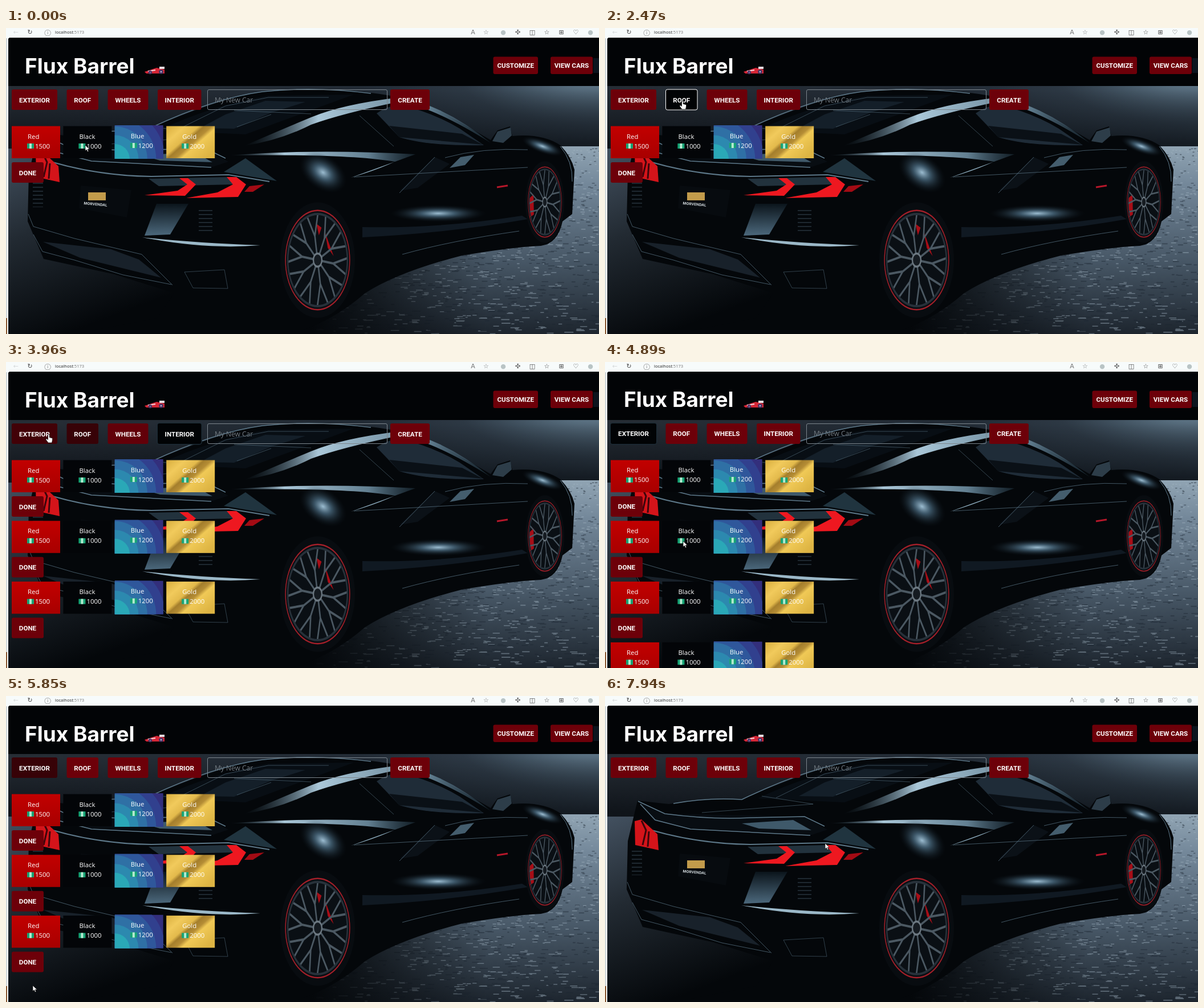
An HTML page that plays this animation: 1040 px wide and 538 px high, repeating every 8000 ms.

```html
<!DOCTYPE html>
<html lang="en">
<head>
<meta charset="utf-8">
<title>Car customizer</title>
<style>
html, body { margin: 0; width: 100%; height: 100%; overflow: hidden; background: #04070a; }
svg { display: block; width: 100%; height: 100%; }
text { dominant-baseline: central; }
.btn { font: 700 11.6px Roboto, sans-serif; fill: #fff; text-anchor: middle; }
.card { font: 11.4px "Open Sans", "Noto Sans", sans-serif; fill: #fff; }
.title { font: 700 37px Inter, sans-serif; fill: #fff; }
.hint { font: 12px "Open Sans", sans-serif; fill: #737b82; }
.url { font: 7.6px "Open Sans", sans-serif; fill: #222; }
.plate { font: 700 6.4px Inter, sans-serif; fill: #d5dce0; text-anchor: middle; }
.icons { font: 11px "DejaVu Sans", sans-serif; fill: #444; text-anchor: middle; }
.line { fill: none; stroke: #5d7889; }
.slats { stroke: #1e2830; stroke-dasharray: 2 5; }
</style>
</head>
<body>
<svg viewBox="0 0 1040 538" preserveAspectRatio="none">
  <defs>
    <linearGradient id="wall">
      <stop stop-color="#262d35"/><stop offset=".6" stop-color="#222b35"/><stop offset="1" stop-color="#3b4a58"/>
    </linearGradient>
    <linearGradient id="wallFade" x2="0" y2="1">
      <stop offset=".5" stop-color="#080c11" stop-opacity="0"/><stop offset=".95" stop-color="#080c11" stop-opacity=".75"/>
    </linearGradient>
    <radialGradient id="lamp">
      <stop stop-color="#7590a3"/><stop offset="1" stop-color="#4a6070" stop-opacity="0"/>
    </radialGradient>
    <linearGradient id="floor" x2="0" y2="1">
      <stop stop-color="#90a4b3"/><stop offset=".2" stop-color="#74889a"/><stop offset=".6" stop-color="#485867"/>
      <stop offset="1" stop-color="#1d252e"/>
    </linearGradient>
    <linearGradient id="floorShade">
      <stop offset=".1" stop-color="#04070a"/><stop offset=".65" stop-color="#04070a" stop-opacity="0"/>
    </linearGradient>
    <linearGradient id="leftFloor" x2=".35" y2="1">
      <stop stop-color="#435160"/><stop offset=".45" stop-color="#222a32"/><stop offset="1" stop-color="#04070a"/>
    </linearGradient>
    <radialGradient id="glow">
      <stop stop-color="#9cbdd1"/><stop offset=".35" stop-color="#466478" stop-opacity=".85"/>
      <stop offset="1" stop-color="#0c151c" stop-opacity="0"/>
    </radialGradient>
    <linearGradient id="shine">
      <stop stop-color="#2d4656" stop-opacity="0"/><stop offset=".3" stop-color="#aac7d8"/>
      <stop offset=".75" stop-color="#627f91"/><stop offset="1" stop-color="#2d4656" stop-opacity=".4"/>
    </linearGradient>
    <linearGradient id="panel" x2="0" y2="1">
      <stop stop-color="#0b141b"/><stop offset="1" stop-color="#4c687c"/>
    </linearGradient>
    <linearGradient id="redCard" x2="0" y2="1"><stop stop-color="#c20000"/><stop offset="1" stop-color="#a80000"/></linearGradient>
    <linearGradient id="goldCard" x2="1" y2=".75">
      <stop stop-color="#d8ae3e"/><stop offset=".25" stop-color="#f1ca5c"/><stop offset=".43" stop-color="#e3ba4c"/>
      <stop offset=".5" stop-color="#a47e2c"/><stop offset=".6" stop-color="#b58d35"/><stop offset=".68" stop-color="#f0c956"/>
      <stop offset="1" stop-color="#ddb443"/>
    </linearGradient>
    <clipPath id="pageClip"><path d="M4 538V21q0-4 4-4H1040V538z"/></clipPath>
    <clipPath id="blueClip"><path d="M0 0h85v59h-85z"/></clipPath>
  </defs>

  <rect width="1040" height="538" fill="#f7fbfb"/>
  <path d="M1 18V510" stroke="#d2dadc" stroke-width="2"/><path d="M1 510V538" stroke="#8a5a34" stroke-width="2"/>

  <g clip-path="url(#pageClip)">
    <!-- backdrop -->
    <rect width="1040" height="538" fill="#04070a"/>
    <rect width="1040" height="215" fill="url(#wall)"/>
    <ellipse cx="1030" cy="75" rx="240" ry="95" fill="url(#lamp)"/>
    <rect width="1040" height="215" fill="url(#wallFade)"/>
    <rect y="212" width="300" height="326" fill="url(#leftFloor)"/>
    <rect x="480" y="208" width="560" height="330" fill="url(#floor)"/>
    <g id="grain" stroke-width="1.6" opacity=".45"></g>
    <rect x="480" y="208" width="560" height="330" fill="url(#floorShade)"/>

    <!-- body -->
    <path fill="#04070a" d="M57 184L112 190Q175 178 240 182Q380 121 450 112Q540 101 640 114Q730 124 790 162L850 197L862 180L884 173L888 190Q940 185 972 206Q992 227 997 249L993 327L976 340Q968 379 938 383Q890 385 800 400Q690 428 630 466Q570 518 500 538H120L265 510L295 466L190 433L66 406L38 340L40 255z"/>
    <path d="M268 180Q360 136 460 119L610 117L520 150L420 187z" fill="#080e14"/>
    <path d="M385 152L455 128L525 130L465 149L400 177L340 176z" fill="#141f29"/>
    <g class="line">
      <path d="M120 189Q180 178 240 182Q360 124 450 112Q540 102 640 115" stroke-width="1.5"/>
      <path d="M300 179L385 137L460 122H566M400 145L535 151M405 174L465 152M275 176L365 190L170 205M620 154L680 208" opacity=".55"/>
    </g>
    <path d="M418 207Q480 180 535 157T690 122Q770 136 850 202Q755 142 692 129Q590 150 535 170Q480 198 418 207z" fill="url(#shine)"/>
    <path d="M650 150Q668 137 690 135Q748 148 796 177L838 206Q740 208 690 192z" fill="#1f2c38"/>
    <path d="M672 172L800 186L836 205L690 192z" fill="#0a1016"/>
    <path d="M862 182L885 175L887 189L872 202L853 199z" fill="#2d3d49"/>

    <path d="M390 224Q540 212 718 222L682 235Q600 221 390 224z" fill="url(#shine)"/>
    <path d="M718 222L605 263Q650 250 682 235z" fill="#8aa8b9"/>
    <ellipse cx="556" cy="254" rx="46" ry="30" fill="url(#glow)" transform="rotate(35 556 254)"/>
    <path d="M752 227L691 286L722 281L778 239z" fill="#0b1117"/>
    <path class="line" d="M752 227L690 290M610 262L915 245M770 228Q835 210 915 214M695 398Q780 374 900 357" opacity=".7"/>
    <path d="M778 246L797 227L821 223L805 241z" fill="#445d6d"/>
    <ellipse cx="758" cy="326" rx="84" ry="15" fill="url(#glow)"/>
    <path d="M625 350Q760 353 905 330L915 336Q780 360 625 368z" fill="#101922"/>
    <ellipse cx="941" cy="208" rx="38" ry="12" fill="url(#glow)" transform="rotate(20 941 208)"/>
    <path class="line" d="M972 208Q994 234 993 270"/>
    <path d="M861 280L880 277" stroke="#b5172a" stroke-width="3"/>

    <!-- tail -->
    <path d="M57 184L105 207L350 212L390 235L360 245L150 235L86 219z" fill="#080d12"/>
    <path class="line" d="M58 185L105 207Q190 218 255 214L350 212L385 229M62 190L88 218L150 234L360 245" stroke-width="1.5"/>
    <path d="M240 224L330 218L362 236L270 233z" fill="#3f596a"/>
    <path class="line" d="M82 236Q165 260 255 261L390 258L462 270" stroke-width="2.2"/>
    <path d="M382 253L420 229L475 269z" fill="#20343f"/>
    <path d="M250 265L392 262L400 275L268 278z" fill="#22323d"/>
    <path d="M52 220L64 217L92 243L94 271L53 262z" fill="#d4141a"/>
    <path d="M64 219L72 236L66 262M77 238L75 265" fill="none" stroke="#3c060b" stroke-width="3"/>
    <g fill="#ee1820">
      <path d="M243 294L301 286L318 275L304 264H319L333 275L314 295z"/>
      <path d="M316 299L371 289L398 275L387 262H404L421 275L407 297z"/>
      <path d="M418 288L427 278L453 275L433 288z" fill="#a30b14"/>
    </g>
    <path d="M131 277L220 285L212 333L128 317z" fill="#070b0f"/>
    <rect x="144" y="289" width="31" height="14" fill="#c29b4b"/>
    <text class="plate" x="157" y="310" transform="rotate(5 157 310)">MORVENDAL</text>
    <path d="M264 309L320 309L288 363L243 365z" fill="url(#panel)"/>
    <path d="M239 368Q330 378 446 382Q350 390 239 368z" fill="#9bb8c8"/>
    <path class="slats" d="M56 272V315" stroke-width="18"/><path class="slats" d="M350 320V358" stroke-width="24"/>
    <path class="line" d="M39 327L48 349L120 370L238 398L292 452M48 363L64 393L120 408L205 434L290 451" opacity=".7"/>
    <path d="M65 376L184 389L233 407L272 439L130 404z" fill="#18212a"/>
    <path class="line" d="M313 429L383 425L389 458L328 457z" opacity=".5"/>
    <g id="wheels"></g>

    <g id="page">
      <rect width="1040" height="102" fill="#020406"/>
      <path d="M1030 53h10v26h-10z" fill="#0c151e"/>
      <text class="title" x="33" y="66">Flux Barrel</text>
      <path d="M243 77L264 70L278 73V80H246z" fill="#d62636"/><path d="M269 68h9v4h-9z" fill="#eadfe4"/>
      <path d="M249 76l13-2" stroke="#f5d8dd" stroke-width="2"/>
      <g fill="#c9bfd5" stroke="#4b3568" stroke-width="2.5"><circle cx="253" cy="78" r="2"/><circle cx="272" cy="77" r="2.600"/></g>
      <rect x="353.500" y="108.500" width="315" height="35" rx="2.500" fill="none" stroke="#7d868d"/>
      <text class="hint" x="366" y="126">My New Car</text>
      <g id="controls"></g>
    </g>
  </g>

  <g class="icons" id="icons"></g>
  <text class="url" x="86" y="7">localhost<tspan fill="#777">:5173</tspan></text>
  <path id="arrow" d="M0 0V10L2.400 7.800L4 11.500L5.800 10.700L4.200 7.200H7.500z" fill="#fff" stroke="#111" stroke-width=".7"/>
  <path id="hand" d="M-1.500 1q1.500-2 2.700 0V5.500L6 6.700Q7 7 6.500 10L5.500 15H-1L-5 9.500q-.5-2 1.500-1.500L-1.500 9.500z" fill="#fff" stroke="#111" stroke-width=".8"/>
</svg>

<script>
const LOOP = 8000, STEP = 125, FADE = 250, PRESS = 300, ROW_GAP = 106.8, SCROLL = 67;
const $ = id => document.getElementById(id);
const clamp = v => Math.min(1, Math.max(0, v));
const ease = v => v * v * (3 - 2 * v);
const latest = (list, t) => list.findLast(entry => entry[0] <= t);

// Key points of the pointer's path: time, x, y
const path = [
  [0, 139, 206], [600, 337, 210], [750, 412, 180], [875, 53, 250], [1000, 46, 249], [1570, 46, 249],
  [1875, 133, 130], [2375, 136, 128], [2500, 205, 129], [2625, 210, 129], [2750, 295, 128], [3000, 308, 127],
  [3375, 307, 127], [3875, 75, 127], [4375, 71, 124], [4875, 137, 315], [5125, 137, 315],
  [5500, 47, 509], [5900, 47, 509], [6250, 38, 466], [6500, 38, 466], [7000, 38, 366], [7125, 38, 366],
  [7375, 38, 260], [7625, 38, 254], [7875, 386, 259]
];
const rowCounts = [[0, 1], [1570, 0], [2230, 1], [2600, 2], [3020, 3], [4080, 4], [5730, 3], [6480, 2], [7160, 1], [7700, 0]];
const focusChanges = [[0, ""], [2230, "ROOF"], [2520, "WHEELS"], [2830, "INTERIOR"], [4030, "EXTERIOR"], [5730, ""]];

const rowsAt = t => latest(rowCounts, t)[1];
const scrollAt = t => t < 5730 ? SCROLL * ease(clamp((t - 4890) / 240)) : 0;

function pointerAt(t) {
  const time = Math.floor(t / STEP) * STEP;
  const next = path.findIndex(p => p[0] > time);
  if (next < 0) return path.at(-1).slice(1);
  const [t0, x0, y0] = path[next - 1], [t1, x1, y1] = path[next];
  const k = ease((time - t0) / (t1 - t0));
  return [x0 + (x1 - x0) * k, y0 + (y1 - y0) * k];
}

// Layout
const buttons = [];
let nextX = 10;
for (const [label, w] of [["EXTERIOR", 80], ["ROOF", 55.500], ["WHEELS", 71], ["INTERIOR", 76.500]]) {
  buttons.push({ label, x: nextX, y: 108, w, h: 36 });
  nextX += w + 16.500;
}
buttons.push(
  { label: "CREATE", x: 674, y: 108, w: 69, h: 36 },
  { label: "CUSTOMIZE", x: 854.500, y: 50.500, w: 78.500, h: 30.500 },
  { label: "VIEW CARS", x: 955, y: 50.500, w: 74, h: 30.500 });
for (let row = 0; row < 4; row++)
  buttons.push({ label: "DONE", x: 10, y: 236 + row * ROW_GAP, w: 56, h: 36, row });

const buttonMarkup = ({ label, x, y, w, h }) =>
  `<g class="btn"><rect class="ring" x="${x - .5}" y="${y - .5}" width="${w + 1}" height="${h + 1}" rx="4" fill="none" stroke="#1c2b35" stroke-width="2"/>
   <rect class="face" x="${x}" y="${y}" width="${w}" height="${h}" rx="3"/>
   <text x="${x + w / 2}" y="${y + h / 2 + .5}">${label}</text></g>`;

const rings = ["#31408e", "#2f579b", "#2f70a5", "#2c89af", "#2aa8b7"]
  .map((color, i) => `<circle cy="59" r="${88 - 15.500 * i}" fill="${color}"/>`).join("");
const swatch = fill => `<rect y="1.500" width="85" height="56.500" fill="${fill}"/>`;
const paints = [
  { name: "Red", price: 1500, art: swatch("url(#redCard)") },
  { name: "Black", price: 1000, art: swatch("#030508") },
  { name: "Blue", price: 1200, lift: 1, art: `<g clip-path="url(#blueClip)"><rect width="85" height="59" fill="#332f7c"/>${rings}</g>` },
  { name: "Gold", price: 2000, art: swatch("url(#goldCard)") }
];
const cardMarkup = ({ name, price, art, lift = 0 }, i) =>
  `<g transform="translate(${10 + 90.400 * i} 171)">${art}<g transform="translate(28 ${19 - lift})">
   <text class="card">${name}</text>
   <path d="M-1 13h12v9h-12z" fill="#16a475"/><path d="M3 13h4v9h-4z" fill="#b5ead0"/>
   <text class="card" x="13" y="17">${price}</text></g></g>`;
const rowMarkup = row => `<g class="row" transform="translate(0 ${row * ROW_GAP})">${paints.map(cardMarkup).join("")}</g>`;

function wheel(cx, cy, rx, ry, caliper) {
  let spokes = "";
  for (let a = 0; a < 360; a += 36)
    spokes += `<path d="M10 0H48L91 -17M48 0L91 17" transform="rotate(${a + 8})"/>`;
  return `<g transform="translate(${cx} ${cy}) scale(${rx / 100} ${ry / 100})">
    <circle r="114" fill="#080c10"/><circle r="97" fill="#0a0f14"/>
    <path d="${caliper}" fill="#a60e17"/>
    <g fill="none" stroke="#4b5862" stroke-width="4.500">${spokes}<circle r="91" stroke="#27313a"/></g>
    <circle r="98" fill="none" stroke="#a51f29" stroke-width="2.600"/>
    <circle r="13" fill="#151b21" stroke="#6c7881" stroke-width="4"/></g>`;
}

function grain(count, seed, color) {
  const rand = () => (seed = seed * 16807 % 2147483647) / 2147483647;
  let d = "";
  for (let i = 0; i < count; i++) {
    const depth = rand() ** 1.4;
    d += `M${500 + 540 * rand()} ${212 + 326 * depth}h${3 + 14 * depth * rand()}`;
  }
  return `<path d="${d}" stroke="${color}"/>`;
}

const toolbar = [..."●✣◫☆⊞♡●"].map((icon, i) => [icon, 872 + 25.500 * i, icon === "●" ? "#b9c4c5" : "#444"]);
toolbar.push(["←", 17, "#d5d9da"], ["↻", 42, "#444"], ["ⓘ", 73, "#777"], ["A", 819, "#777"], ["☆", 842, "#777"]);
$("icons").innerHTML = toolbar.map(([icon, x, color]) => `<text x="${x}" y="7" fill="${color}">${icon}</text>`).join("");
$("grain").innerHTML = grain(1100, 71, "#a3b5c3") + grain(1100, 913, "#1b2530");
$("wheels").innerHTML =
  wheel(546.500, 408, 57.500, 89, "M-4-72L12-64L4-49zM23-54L49-8L31-24z") +
  wheel(945, 306, 30, 63, "M-91-10L-66-22L-64 35L-86 42z");
$("controls").innerHTML = [0, 1, 2, 3].map(rowMarkup).join("") + buttons.map(buttonMarkup).join("");

const groups = [...document.querySelectorAll(".btn")];
const rows = [...document.querySelectorAll(".row")];

const visible = (button, t) => !(button.row >= rowsAt(t));
function hovered(button, t) {
  const [x, y] = pointerAt(t), dx = x - button.x, dy = y + scrollAt(t) - button.y;
  return visible(button, t) && dx >= 0 && dx <= button.w && dy >= 0 && dy <= button.h;
}
const active = (button, t) => hovered(button, t) || latest(focusChanges, t)[1] === button.label;

// A colour fade equals the share of the last FADE ms spent active
function darkness(button, t) {
  const samples = 10;
  let sum = 0;
  for (let i = 0; i < samples; i++) sum += active(button, Math.max(0, t - FADE * i / samples));
  return sum / samples;
}

function paintButton(group, button, t) {
  const k = 1 - darkness(button, t);
  const [since, label] = latest(focusChanges, t);
  const focused = label === button.label, pressed = focused && t - since < PRESS;
  const face = group.querySelector(".face");
  group.style.display = visible(button, t) ? "" : "none";
  face.setAttribute("fill", `rgb(${1 + 108 * k},${3 - 3 * k},${5 + 4 * k})`);
  face.setAttribute("stroke", pressed ? "#fff" : "none");
  group.querySelector(".ring").style.display = focused && !pressed ? "" : "none";
}

function render(t) {
  const overButton = buttons.some(b => hovered(b, t));
  $("page").setAttribute("transform", `translate(0 ${-scrollAt(t)})`);
  rows.forEach((row, i) => row.style.display = i < rowsAt(t) ? "" : "none");
  groups.forEach((group, i) => paintButton(group, buttons[i], t));
  for (const [id, on] of [["hand", overButton], ["arrow", !overButton]]) {
    $(id).style.display = on ? "" : "none";
    $(id).setAttribute("transform", `translate(${pointerAt(t).join(" ")})`);
  }
}

const start = performance.now();
function frame() {
  render((performance.now() - start) % LOOP);
  requestAnimationFrame(frame);
}
frame();
</script>
</body>
</html>
```
